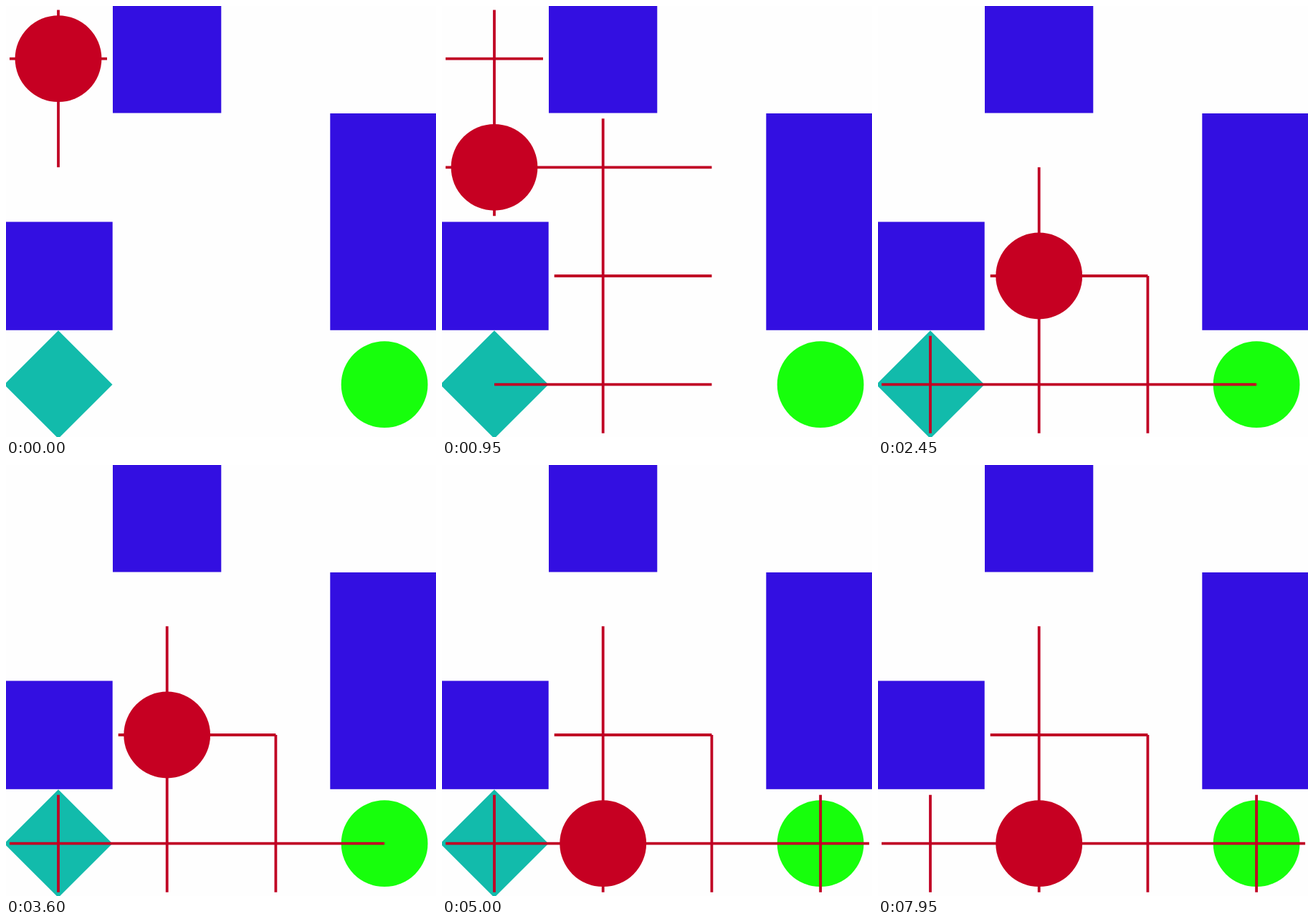
Recreate the animation shown at these times as an HTML page with a canvas. Size 600 by 602 pixels, loop 8000 ms.

```html
<!DOCTYPE html>
<html lang="en">
<head>
<meta charset="utf-8">
<title>Grid search</title>
<style>
  html, body { margin: 0; width: 100%; height: 100%; overflow: hidden; background: #fefefe; }
  canvas { display: block; }
</style>
</head>
<body>
<canvas id="stage" width="600" height="602"></canvas>
<script>
const ctx = document.getElementById('stage').getContext('2d');
const LOOP = 8000, SIZE = 4, CELL = 151.7, STUB = 68;
const RED = '#c60022', BLUE = '#330fe1', TEAL = '#12bbab', GREEN = '#17ff0c';
const WALLS = ['1,0', '3,1', '3,2', '0,2'];
const PICKUP = 5350;

// Agent moves: [time, column, row]
const moves = [
  [0, 0, 0], [850, 0, 1], [1700, 1, 1], [2250, 1, 2],
  [3800, 1, 3], [PICKUP, 0, 3], [6550, 1, 3]
];

// Expanded cells: [column, row, shown from, shown until]
const cells = [
  [0, 0, 0, 1700], [0, 1, 200, 2250], [1, 1, 350, 2250],
  [1, 2, 500, LOOP], [1, 3, 650, LOOP], [0, 3, 1100, LOOP],
  [2, 1, 1300, 2250], [2, 3, 2400, LOOP], [3, 3, 4350, LOOP]
];

const cx = col => 73 + col * CELL;
const cy = row => 73.6 + row * CELL;
const isOpen = (col, row) =>
  col >= 0 && row >= 0 && col < SIZE && row < SIZE && !WALLS.includes(col + ',' + row);

function rect(x, y, w, h) {
  ctx.fillStyle = BLUE;
  ctx.fillRect(x, y, w, h);
}

function disc(col, row, color) {
  ctx.fillStyle = color;
  ctx.beginPath();
  ctx.arc(cx(col), cy(row), 60.4, 0, 2 * Math.PI);
  ctx.fill();
}

function diamond(col, row) {
  const x = cx(col), y = cy(row), r = 75.5;
  ctx.fillStyle = TEAL;
  ctx.beginPath();
  ctx.moveTo(x, y - r);
  ctx.lineTo(x + r, y);
  ctx.lineTo(x, y + r);
  ctx.lineTo(x - r, y);
  ctx.fill();
}

// One arm per action; blocked actions stop short of the cell edge.
function arms(col, row) {
  for (const [dx, dy] of [[1, 0], [-1, 0], [0, 1], [0, -1]]) {
    const length = isOpen(col + dx, row + dy) ? CELL : STUB;
    ctx.moveTo(cx(col), cy(row));
    ctx.lineTo(cx(col) + dx * length, cy(row) + dy * length);
  }
}

function draw(t) {
  ctx.fillStyle = '#fefefe';
  ctx.fillRect(0, 0, 600, 602);
  rect(149, 0, 151.3, 149.5);
  rect(452.3, 150, 147.7, 302.8);
  rect(0, 301.5, 148.7, 151.3);
  if (t < PICKUP) diamond(0, 3);
  disc(3, 3, GREEN);

  ctx.strokeStyle = '#c00024';
  ctx.lineWidth = 3.8;
  ctx.beginPath();
  for (const [col, row, from, until] of cells) {
    if (t >= from && t < until) arms(col, row);
  }
  ctx.stroke();

  const [, col, row] = moves.filter(move => move[0] <= t).pop();
  disc(col, row, RED);
}

const start = performance.now();
function tick() {
  draw((performance.now() - start) % LOOP);
  requestAnimationFrame(tick);
}
tick();
</script>
</body>
</html>
```
